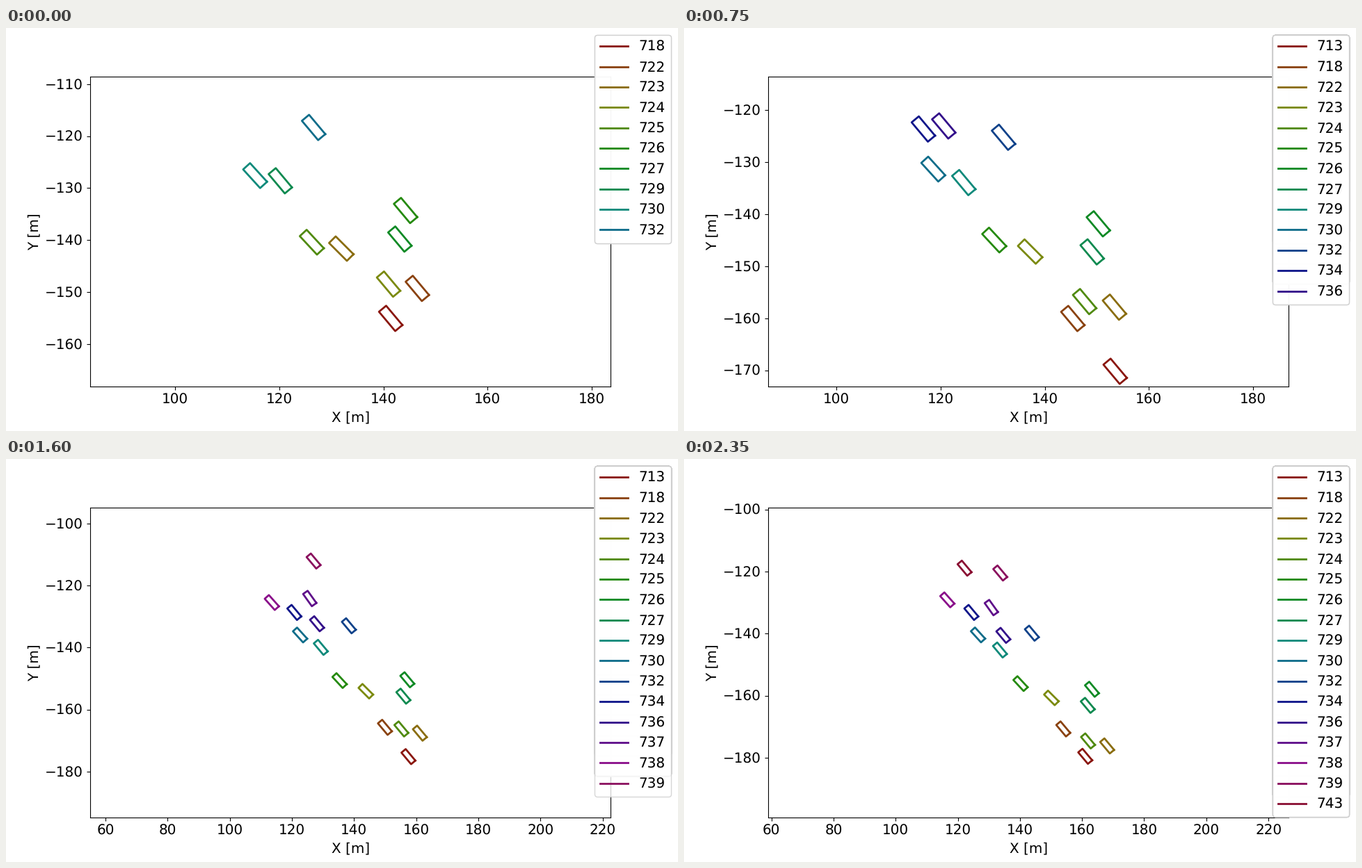
Write a matplotlib script that moves like this. It is 966 px wide and 580 px high and loops after 2.4 s.

```python
import colorsys

import numpy as np
import matplotlib.pyplot as plt
from matplotlib.animation import FuncAnimation
from matplotlib.lines import Line2D

FRAMES, INTERVAL = 48, 50
HALF_VIEW = 50
LINE_WIDTH = 2
FULL_LAYERS = 5             # older legends are covered except for their border

# Straight road in metres: cars drive along it, lanes are counted across it
ROAD_ANGLE = np.radians(-51.3)
ALONG = np.array([np.cos(ROAD_ANGLE), np.sin(ROAD_ANGLE)])
ACROSS = np.array([-ALONG[1], ALONG[0]])
LANE_WIDTH, FIRST_LANE = 3.8, 13.4
ENTRY = 166.3               # cars show up once they pass this point
MERGE_BOOST = .13           # cars moving up a lane also speed up
LENGTH, WIDTH = 4.85, 1.8
YAW = np.radians(1.3)       # tilt of the body against the driving direction


class Car:
    def __init__(self, vid, lane, start, travel, shift=0, since=0):
        self.vid, self.lane, self.start, self.travel = vid, lane, start, travel
        self.shift, self.since = shift, since
        drift = np.arctan2(shift * LANE_WIDTH, travel)
        a = ROAD_ANGLE + drift + YAW
        axis = np.array([np.cos(a), np.sin(a)]) * LENGTH / 2
        side = np.array([-np.sin(a), np.cos(a)]) * WIDTH / 2
        corners = [(1, 1), (1, -1), (-1, -1), (-1, 1), (1, 1)]
        self.body = np.array([p * axis + q * side for p, q in corners])

    def progress(self, frame):
        u = frame / (FRAMES - 1)
        return u + (MERGE_BOOST * u * (u - 1) if self.shift > 0 else 0)

    def distance(self, frame):
        return self.start + self.travel * self.progress(frame)

    def center(self, frame):
        lane = self.lane + self.shift * self.progress(frame)
        return (self.distance(frame) * ALONG
                + (FIRST_LANE + LANE_WIDTH * lane) * ACROSS)

    def visible(self, frame):
        return frame >= self.since and self.distance(frame) >= ENTRY


CARS = [
    Car(713, 0, 223.2, 17.6, since=14),
    Car(718, 0, 209.4, 20.1),
    Car(722, 2, 208.1, 34.5),
    Car(723, .26, 193, 26.3, shift=.6),
    Car(724, 1, 204, 33.5),
    Car(725, -.7, 188.5, 21, shift=.28),
    Car(726, 4, 195, 30.3),
    Car(727, 2.87, 198.6, 29.9),
    Car(729, 0, 175.5, 21.4),
    Car(730, -.83, 171.7, 17, shift=.18),
    Car(732, 3, 171.5, 27.6),
    Car(734, .1, 163.7, 18),
    Car(736, 1, 160.9, 33),
    Car(737, 2.25, 156.5, 28, shift=-.57),
    Car(738, -.93, 160, 13.7, shift=.11),
    Car(739, 4.1, 144.1, 33.5),
    Car(743, 2, 136.2, 33),
]
COLORS = [colorsys.hls_to_rgb(h + .01, .3, .8)
          for h in np.arange(len(CARS)) / len(CARS)]

plt.rcParams["font.family"] = "DejaVu Sans"
plt.rcParams["font.size"] = 14.4
plt.rcParams["text.hinting"] = "none"

fig, ax = plt.subplots(figsize=(9.66, 5.8), dpi=100)
ax.set_xlabel("X [m]")
ax.set_ylabel("Y [m]")
lines = [ax.plot([], [], color=c, lw=LINE_WIDTH)[0] for c in COLORS]
box = ax.get_window_extent()
ASPECT = box.height / box.width


def make_legend(group):
    handles = [Line2D([], [], color=c, lw=LINE_WIDTH, label=str(car.vid))
               for car, c in zip(group, COLORS)]
    return fig.legend(handles=handles, loc="upper right")


groups = [tuple(c for c in CARS if c.visible(f)) for f in range(FRAMES)]
legends = {g: make_legend(g) for g in dict.fromkeys(groups)}
fig.canvas.draw()   # lays out the legend frames


def set_view(mid, shapes):
    ys = np.concatenate(shapes)[:, 1]
    half_x, half_y = HALF_VIEW, HALF_VIEW * ASPECT
    if 1.05 * np.ptp(ys) > 2 * half_y:
        half_x, half_y = HALF_VIEW / ASPECT, HALF_VIEW
    ax.set_xlim(mid[0] - half_x, mid[0] + half_x)
    ax.set_ylim(mid[1] - half_y, mid[1] + half_y)


def update(frame):
    group = groups[frame]
    centers = [car.center(frame) for car in group]
    shapes = [car.body + p for car, p in zip(group, centers)]
    for n, line in enumerate(lines):
        line.set_data(*(shapes[n].T if n < len(group) else ([], [])))
    set_view(np.mean(centers, axis=0), shapes)

    # Translucent legends pile up, one per step
    stack = [legends[g] for g in groups[:1] + groups[:frame + 1]]
    fig.patches[:] = [leg.get_frame() for leg in stack[:-FULL_LAYERS]]
    fig.legends[:] = stack[-FULL_LAYERS:]
    return lines


anim = FuncAnimation(fig, update, frames=FRAMES, interval=INTERVAL, repeat=True)
plt.show()
```
